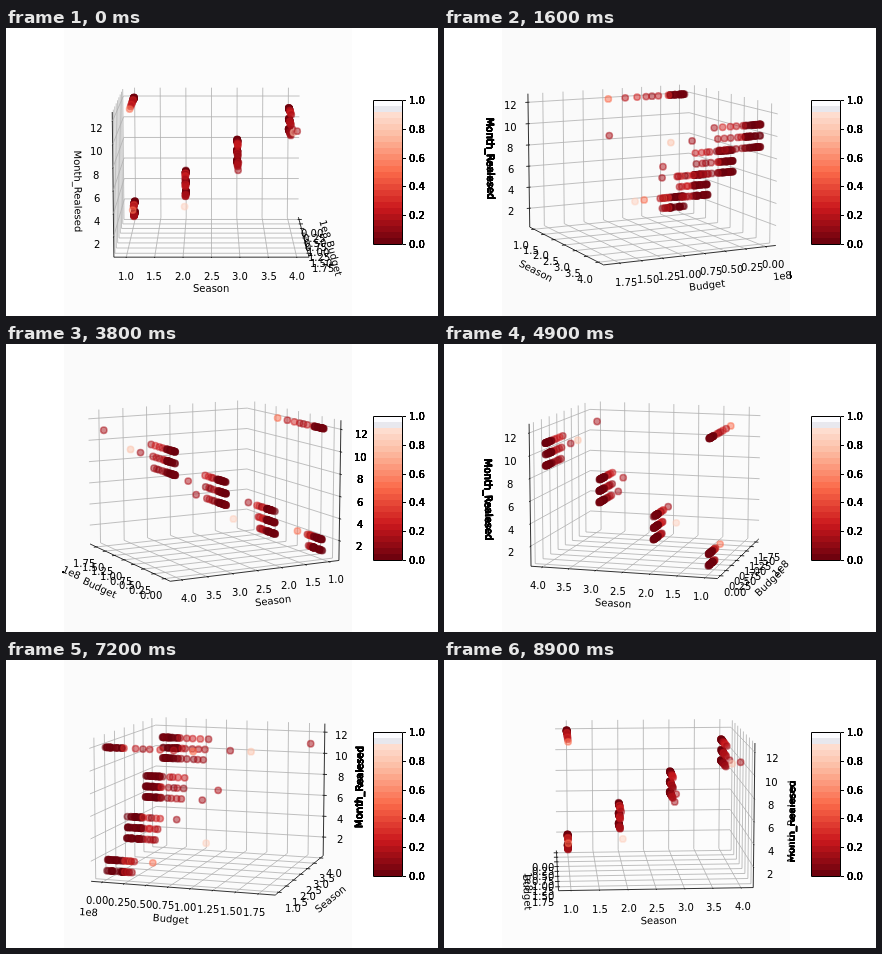
Animation, 432 px wide and 288 px high, one loop 9000 ms. Source, as an HTML page with a canvas:

```html
<!DOCTYPE html>
<html lang="en">
<head>
<meta charset="utf-8">
<title>Rotating 3D scatter</title>
<style>
html, body { margin: 0; width: 432px; height: 288px; overflow: hidden; background: #fff; }
canvas { display: block; }
</style>
</head>
<body>
<canvas id="stage" width="432" height="288"></canvas>
<script>
const ctx = document.getElementById('stage').getContext('2d');
const BOX = [8 / 7, 8 / 7, 6 / 7];
const EDGE = 0.5 + 1 / 48, TICK = EDGE + 11.5 / 144, LABEL = EDGE + 25 / 144;
const ELEV = Math.PI / 18, SIN_E = Math.sin(ELEV), COS_E = Math.cos(ELEV);

// Position of a value along its axis, from -0.5 to 0.5 with a 5% margin
const place = (v, lo, hi) => ((v - lo) / (hi - lo) - 0.5) / 1.1;

function makeAxis(name, lo, hi, first, step, digits, tickDir) {
  const ticks = [];
  for (let v = first; v <= hi; v += step) ticks.push({ pos: place(v, lo, hi), text: v.toFixed(digits) });
  return { name, ticks, tickDir };
}
const axes = [
  makeAxis('Budget', 0, 1.8, 0, 0.25, 2, 1),
  makeAxis('Season', 1, 4, 1, 0.5, 1, 0),
  makeAxis('Month_Realesed', 1, 12, 2, 2, 0, 0)
];

let seed = 12345;
const random = () => (seed = seed * 16807 % 2147483647) / 2147483647;

const REDS = ['#67000d', '#cb181d', '#fb6a4a', '#fcbba1', '#fff5f0'];
const channel = (hex, j) => parseInt(hex.slice(1 + 2 * j, 3 + 2 * j), 16);
function red(v, alpha = 1) {
  const i = Math.min(3, Math.floor(v * 4)), k = v * 4 - i;
  const rgb = [0, 1, 2].map(j => Math.round(channel(REDS[i], j) * (1 - k) + channel(REDS[i + 1], j) * k));
  return `rgba(${rgb},${alpha})`;
}

const points = [];
function addPoint(month, share, shade) {
  const season = Math.floor(month % 12 / 3) + 1;
  points.push({
    pos: [place(share, 0, 1), place(season, 1, 4), place(month, 1, 12)],
    color: red(shade, 0.5)
  });
}
// Every month: a dense dark cluster of small budgets and a redder tail
for (let month = 1; month <= 12; month++) {
  for (let n = 0; n < 18; n++) addPoint(month, 0.11 * random(), 0.05 * random());
  const reach = 0.03 + 0.015 * month;
  for (let n = 0; n < 5; n++) {
    addPoint(month, 0.11 + reach * (n + 0.6 * random()) / 4, 0.08 + 0.22 * random());
  }
}
// Month, share of the largest budget and shade of the outliers
[[2, 0.155, 0.5], [2, 0.295, 0.52], [3, 0.52, 0.84], [5, 0.33, 0.15], [6, 0.385, 0.15],
  [7, 0.49, 0.18], [10, 0.465, 0.15], [10, 0.605, 0.78], [11, 1, 0.16], [12, 0.43, 0.2],
  [12, 0.55, 0.5]].forEach(p => addPoint(...p));

let sinA, cosA;
function project(p) {
  const [x, y, z] = p.map((v, i) => v * BOX[i]);
  const front = cosA * x + sinA * y;
  const depth = front * COS_E + z * SIN_E;
  const k = 288 / 0.185 / (10 - depth);
  return [205.49 + (cosA * y - sinA * x) * k, 140.1 + (front * SIN_E - z * COS_E) * k, depth];
}

function path(color, ...pts) {
  ctx.strokeStyle = color;
  ctx.lineWidth = 0.8;
  ctx.beginPath();
  for (const p of pts) ctx.lineTo(p[0], p[1]);
  ctx.stroke();
}

// Text is smooth on the plot background and heavy on the white around it
function write(text, x, y, drop, angle = 0, anchor = 0.5) {
  const left = -ctx.measureText(text).width * anchor;
  const put = heavy => {
    if (!angle) return ctx.fillText(text, Math.round(x + left), Math.round(y + drop));
    ctx.save();
    ctx.translate(x, y);
    ctx.rotate(angle);
    ctx.fillText(text, left, drop);
    if (heavy) ctx.strokeText(text, left, drop);
    ctx.restore();
  };
  ctx.fillStyle = ctx.strokeStyle = '#000';
  put(false);
  ctx.save();
  ctx.beginPath();
  ctx.rect(0, 0, 58, 288);
  ctx.rect(346, 0, 86, 288);
  ctx.clip();
  ctx.lineWidth = 0.6;
  for (let n = 0; n < 6; n++) put(true);
  ctx.restore();
}

function drawAxis(axis, i, near) {
  const side = [[0, near[1], -1], [near[0], 0, -1], [near[0], -near[1], 0]][i];
  const at = (pos, dist) => side.map((s, j) => j === i ? pos : s * dist);
  const a = project(at(-EDGE, EDGE)), b = project(at(EDGE, EDGE));
  path('#000', a, b);

  for (const { pos } of axis.ticks) {
    const corner = near.map((s, j) => j === i ? pos : -s * EDGE);
    const ends = [0, 1, 2].filter(j => j !== i)
      .map(j => corner.map((v, k) => k === j ? -v : v));
    path('#b0b0b0', ...[ends[0], corner, ends[1]].map(project));
  }
  for (const { pos, text } of axis.ticks) {
    const tip = shift => {
      const p = at(pos, EDGE);
      p[axis.tickDir] += side[axis.tickDir] * shift / 12;
      return project(p);
    };
    path('#000', tip(0.2), tip(-0.1));
    const [x, y] = project(at(pos, TICK));
    write(text, x, y, 8);
  }

  let angle = Math.atan2(b[1] - a[1], b[0] - a[0]);
  if (angle >= Math.PI / 2) angle -= Math.PI;
  if (angle < -Math.PI / 2) angle += Math.PI;
  const [x, y] = project(at(0, LABEL));
  write(axis.name, x, y, 3, angle);
  if (i === 0) {
    const [ox, oy] = project(at(-near[0] * EDGE, LABEL));
    write('1e8', ox, oy, 3, angle, ox > 205 ? 1 : 0);
  }
}

function drawPoints() {
  const shown = points.map(p => ({ color: p.color, at: project(p.pos) }));
  shown.sort((p, q) => p.at[2] - q.at[2]);
  ctx.lineWidth = 1.5;
  for (const { color, at } of shown) {
    ctx.fillStyle = ctx.strokeStyle = color;
    ctx.beginPath();
    ctx.arc(at[0], at[1], 3.16, 0, 7);
    ctx.fill();
    ctx.stroke();
  }
}

function drawColorbar() {
  for (let n = 0; n < 24; n++) {
    ctx.fillStyle = n === 23 ? '#fcfcff' : n === 22 ? '#e8e8ee' : red((n + 0.5) / 24);
    ctx.fillRect(367, 210 - n * 6, 29, 6);
  }
  ctx.strokeStyle = '#000';
  ctx.lineWidth = 1;
  ctx.strokeRect(367.5, 72.5, 29, 144);
  for (let n = 0; n <= 5; n++) {
    const y = Math.round(216 - n * 28.8);
    ctx.fillStyle = '#000';
    ctx.fillRect(397, y, 3, 1);
    write((n / 5).toFixed(1), 403, y, 4, 0, 0);
  }
}

function draw(step) {
  const azim = step * 4 * Math.PI / 180;
  sinA = Math.sin(azim);
  cosA = Math.cos(azim);
  const near = [cosA, sinA, 1].map(v => v > -1e-9 ? 1 : -1);
  const grey = Math.round(252 - 2 * Math.abs(Math.sin(2 * azim)));

  ctx.fillStyle = '#fff';
  ctx.fillRect(0, 0, 432, 288);
  ctx.fillStyle = `rgb(${grey},${grey},${grey})`;
  ctx.fillRect(58, 0, 288, 288);
  ctx.font = '10px "DejaVu Sans", sans-serif';
  ctx.lineJoin = 'round';
  axes.forEach((axis, i) => drawAxis(axis, i, near));
  drawPoints();
  drawColorbar();
}

function tick() {
  draw(Math.floor(performance.now() / 100) % 90);
  requestAnimationFrame(tick);
}
tick();
</script>
</body>
</html>
```
